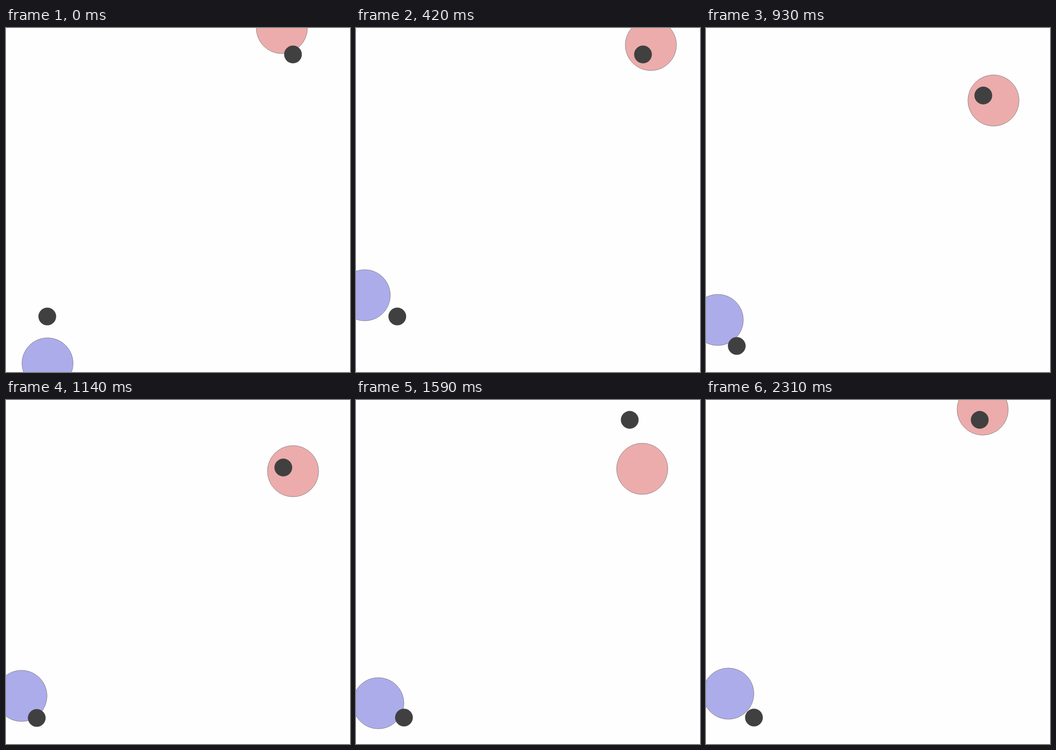
Recreate the animation shown at these times as an HTML page. Size 700x700 px, loop 2.34 s.

```html
<!DOCTYPE html>
<html lang="en">
<head>
<meta charset="utf-8">
<title>Gaze and targets</title>
<style>
  html, body { margin: 0; height: 100%; overflow: hidden; background: #fefefe; }
  svg { display: block; width: 700px; height: 700px; }
  .gaze { stroke: #777; stroke-width: .8; }
  .target { fill: #404040; stroke: #333; stroke-width: .5; }
</style>
</head>
<body>
<svg viewBox="0 0 700 700">
  <circle class="gaze" id="red" r="52.1" fill="#ecacac"/>
  <circle class="gaze" id="blue" r="52.1" fill="#acaceb"/>
  <circle class="target" id="upper" r="17.8"/>
  <circle class="target" id="lower" r="17.8"/>
</svg>
<script>
const TICK = 30, HOLD = 26, DART_START = 3, DART_END = 5;

// Each target jumps once per hold
const targets = {
  upper: [[584, 53.8], [564.3, 137.4], [557, 40.4]],
  lower: [[84, 587], [62.6, 647], [97.6, 646.2]]
};

// Starting point, then where the gaze lands and where it drifts in each hold
const gazes = {
  red: {
    start: [561.3, 0],
    land: [[589.4, 24.3], [585, 147.5], [563.3, 38]],
    rest: [[613, 47], [582.4, 140], [563, 19.4]]
  },
  blue: {
    start: [84.5, 682.5],
    land: [[20, 544.9], [23.9, 594], [54, 603.9]],
    rest: [[15, 542.5], [45.4, 617], [45.4, 597.5]]
  }
};

const clamp = u => Math.min(1, Math.max(0, u));
const smooth = u => u * u * (3 - 2 * u);
const mix = (a, b, u) => a.map((v, i) => v + (b[i] - v) * u);

function gazeAt({ start, land, rest }, hold, tick) {
  const from = hold ? rest[hold - 1] : start;
  const dart = clamp((tick - DART_START) / (DART_END - DART_START));
  const drift = clamp((tick - DART_END) / (HOLD - 1 - DART_END));
  return mix(mix(from, land[hold], smooth(dart)), rest[hold], drift);
}

function place(id, [x, y]) {
  const circle = document.getElementById(id);
  circle.setAttribute("cx", x);
  circle.setAttribute("cy", y);
}

const begin = performance.now();

function draw() {
  const tick = Math.floor((performance.now() - begin) / TICK);
  const hold = Math.floor(tick / HOLD) % 3;
  for (const id in targets) place(id, targets[id][hold]);
  for (const id in gazes) place(id, gazeAt(gazes[id], hold, tick % HOLD));
  requestAnimationFrame(draw);
}
draw();
</script>
</body>
</html>
```
